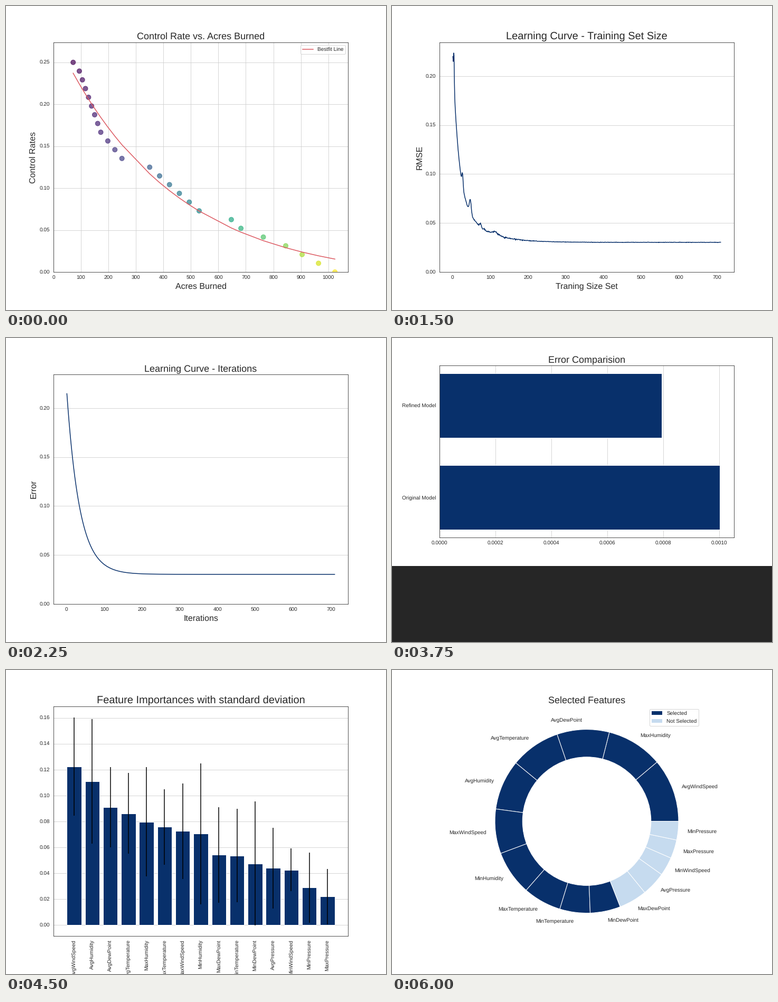
Recreate the animation shown at these times as a matplotlib script. Size 720 px wide and 576 px high, loop 6750 ms.

```python
import numpy as np
import matplotlib.pyplot as plt
from matplotlib.animation import FuncAnimation
from matplotlib.patches import Patch, Rectangle

INK, GRID = "#262626", "#cccccc"
NAVY, PALE, RED = "#08306b", "#c6dbef", "#dc5860"

plt.rcParams.update({
    "font.family": "Liberation Sans", "font.size": 10,
    "text.hinting": "none", "text.color": INK,
    "axes.labelcolor": INK, "axes.edgecolor": INK,
    "xtick.color": INK, "ytick.color": INK,
    "axes.linewidth": 0.8, "axes.axisbelow": True, "axes.labelsize": 16,
    "grid.color": GRID, "grid.linewidth": 0.8, "lines.linewidth": 1.5,
})

fig = plt.figure(figsize=(10, 8), dpi=72, facecolor="white")
FULL = [0.125, 0.125, 0.775, 0.755]
SHORT = [0.125, 0.34375, 0.775, 0.56625]  # chart of a 720 x 432 page


def padded(low, high):
    """Limits with a 5% margin on both sides."""
    pad = 0.05 * (high - low)
    return low - pad, high + pad


def chart(title, size=18, grid="both", rect=FULL, xlabel="", ylabel="",
          xlim=None, ylim=None, xstep=None, ystep=None):
    ax = fig.add_axes(rect, label=title)
    ax.set_title(title, fontsize=size, pad=6)
    ax.set_xlabel(xlabel)
    ax.set_ylabel(ylabel)
    ax.tick_params(length=0, pad=7)
    ax.grid(True, axis=grid)
    if xlim:
        ax.set_xlim(*xlim)
    if ylim:
        ax.set_ylim(*ylim)
    if xstep:
        ax.xaxis.set_major_locator(plt.MultipleLocator(xstep))
    if ystep:
        ax.yaxis.set_major_locator(plt.MultipleLocator(ystep))
    return ax


def rate_chart(title, xlabel, ylabel, x, start, decay, xstep):
    """Evenly falling rates against x, with a fitted decay curve."""
    ax = chart(title, xlabel=xlabel, ylabel=ylabel,
               xlim=(0, padded(x[0], x[-1])[1]), ylim=(0, 0.2737),
               xstep=xstep, ystep=0.05)
    ax.scatter(x, np.linspace(0.25, 0, len(x)), s=80, c=x, cmap="viridis",
               alpha=0.7, linewidths=1)
    ax.plot(x, start * np.exp(-decay * x) - 0.01, color=RED,
            label="Bestfit Line")
    ax.legend(loc="upper right")
    return ax


def acres_chart():
    # three clusters of fire sizes, nearly even within each
    x = np.interp(np.arange(25), [0, 1, 8, 11, 12, 17, 18, 19, 21, 24],
                  [71.5, 94, 172, 249, 350, 530, 647, 682, 845, 1024])
    return rate_chart("Control Rate vs. Acres Burned", "Acres Burned",
                      "Control Rates", x, 0.2931, 0.002388, 100)


def count_chart():
    x = 2 + 32.4 * np.linspace(0, 1, 25) ** 1.8
    return rate_chart("Ignition Rate vs. Fire Count", "Fire Count",
                      "Ignition Rates", x, 0.28, 0.07, 5)


def curve_chart(title, size, xlabel, ylabel, x, y):
    ax = chart(title, size, "y", xlabel=xlabel, ylabel=ylabel,
               xlim=padded(x[0], x[-1]), ylim=(0, 0.2344),
               xstep=100, ystep=0.05)
    ax.plot(x, y, color=NAVY)
    return ax


def size_chart():
    x = np.arange(1, 711)
    y = 0.0303 + 0.147 * np.exp(-x / 14.7) + 0.053 * np.exp(-x / 59)
    bumps = [(3.7, 0.031, 0.9), (26.5, 0.013, 1.5), (47, 0.014, 2.5),
             (74, 0.003, 2), (113, 0.003, 6)]
    for center, height, width in bumps:
        y += height * np.exp(-((x - center) / width) ** 2 / 2)
    noise = np.random.default_rng(4).normal(0, 1, len(x))
    y += noise * (0.0001 + 0.0004 * np.exp(-((x - 110) / 70) ** 2))
    return curve_chart("Learning Curve - Training Set Size", 20,
                       "Traning Size Set", "RMSE", x, y)


def iteration_chart():
    x = np.arange(1, 711)
    return curve_chart("Learning Curve - Iterations", 18, "Iterations",
                       "Error", x, 0.0303 + 0.19 * np.exp(-x / 34))


def name_bars(ax, names, values, **kw):
    n = len(names)
    ax.bar(range(n), values, color=NAVY, edgecolor="white", linewidth=1, **kw)
    ax.set_xticks(range(n), names, rotation=90)
    ax.set_xlim(*padded(-0.4, n - 0.6))


def coef_chart():
    coefs = {"MaxTemperature": 4.37, "MaxHumidity": 2.27,
             "AvgHumidity": 1.95, "MinTemperature": 1.15,
             "MinHumidity": 0.81, "AvgWindSpeed": 0.48,
             "AvgTemperature": -0.48, "AvgDewPoint": -0.99,
             "MaxWindSpeed": -1.09, "MaxDewPoint": -2.77}
    values = np.array(list(coefs.values())) / 1000
    ax = chart("Coeficients of the final model",
               ylim=padded(values.min(), values.max()), ystep=0.001)
    name_bars(ax, list(coefs), values)
    return ax


def error_chart():
    errors = {"Original Model": 0.001002, "Refined Model": 0.000793}
    ax = chart("Error Comparision", 18, "x", SHORT, xlim=(0, 0.0010521),
               ylim=padded(-0.35, 1.35), xstep=0.0002)
    ax.barh(range(2), errors.values(), 0.7, color=NAVY,
            edgecolor="white", linewidth=1)
    ax.set_yticks(range(2), errors)
    return ax


def importance_chart():
    # mean and deviation, in thousandths
    stats = {"AvgWindSpeed": (122.4, 38), "AvgHumidity": (111, 48),
             "AvgDewPoint": (91, 31), "AvgTemperature": (86.3, 31),
             "MaxHumidity": (79.8, 42), "MaxTemperature": (75.8, 29),
             "MaxWindSpeed": (72.5, 37), "MinHumidity": (70.5, 54.5),
             "MaxDewPoint": (54.2, 37), "MinTemperature": (53.7, 36),
             "MinDewPoint": (47.6, 48), "AvgPressure": (44, 31),
             "MinWindSpeed": (42.7, 16.5), "MinPressure": (29, 27),
             "MaxPressure": (22, 21.5)}
    mean, std = np.array(list(stats.values())).T / 1000
    ax = chart("Feature Importances with standard deviation", 20, "y",
               ylim=padded(-0.0003, 0.1607), ystep=0.02)
    name_bars(ax, list(stats), mean, yerr=std, ecolor="black")
    return ax


def ring_chart(title, colors):
    names = ["AvgWindSpeed", "MaxHumidity", "AvgDewPoint", "AvgTemperature",
             "AvgHumidity", "MaxWindSpeed", "MinHumidity", "MaxTemperature",
             "MinTemperature", "MinDewPoint", "MaxDewPoint", "AvgPressure",
             "MinWindSpeed", "MaxPressure", "MinPressure"]
    # slices of nearly equal angle come in runs
    angles = np.repeat([40.1, 35.6, 33.1, 31.7, 28.2, 24.2, 19.2, 17.8,
                        15.4, 11.8], [1, 1, 1, 2, 2, 1, 2, 1, 1, 3])
    ax = fig.add_axes(FULL, label=title)
    ax.pie(angles, labels=names, colors=colors, textprops={"fontsize": 10},
           wedgeprops={"edgecolor": "white", "linewidth": 1})
    ax.add_patch(plt.Circle((0, 0), 0.7, color="white"))
    ax.set_title(title, fontsize=18, pad=6)
    return ax


def selected_chart():
    ax = ring_chart("Selected Features", [NAVY] * 10 + [PALE] * 5)
    ax.legend(handles=[Patch(facecolor=NAVY, label="Selected"),
                       Patch(facecolor=PALE, label="Not Selected")],
              loc="upper right")
    return ax


shades = plt.get_cmap("Blues")(np.linspace(1, 0.25, 15))
band = fig.add_artist(Rectangle((0, 0), 1, 0.25, color=INK, linewidth=0,
                                transform=fig.transFigure))
errors = error_chart()
slides = [acres_chart(), count_chart(), size_chart(), iteration_chart(),
          coef_chart(), errors, importance_chart(),
          ring_chart("Feature Importances", shades), selected_chart()]


def show(i):
    for k, ax in enumerate(slides):
        ax.set_visible(k == i)
    band.set_visible(slides[i] is errors)
    return slides + [band]


show(0)
anim = FuncAnimation(fig, show, frames=len(slides), interval=750,
                     repeat=True, repeat_delay=0, blit=False)
plt.show()
```
